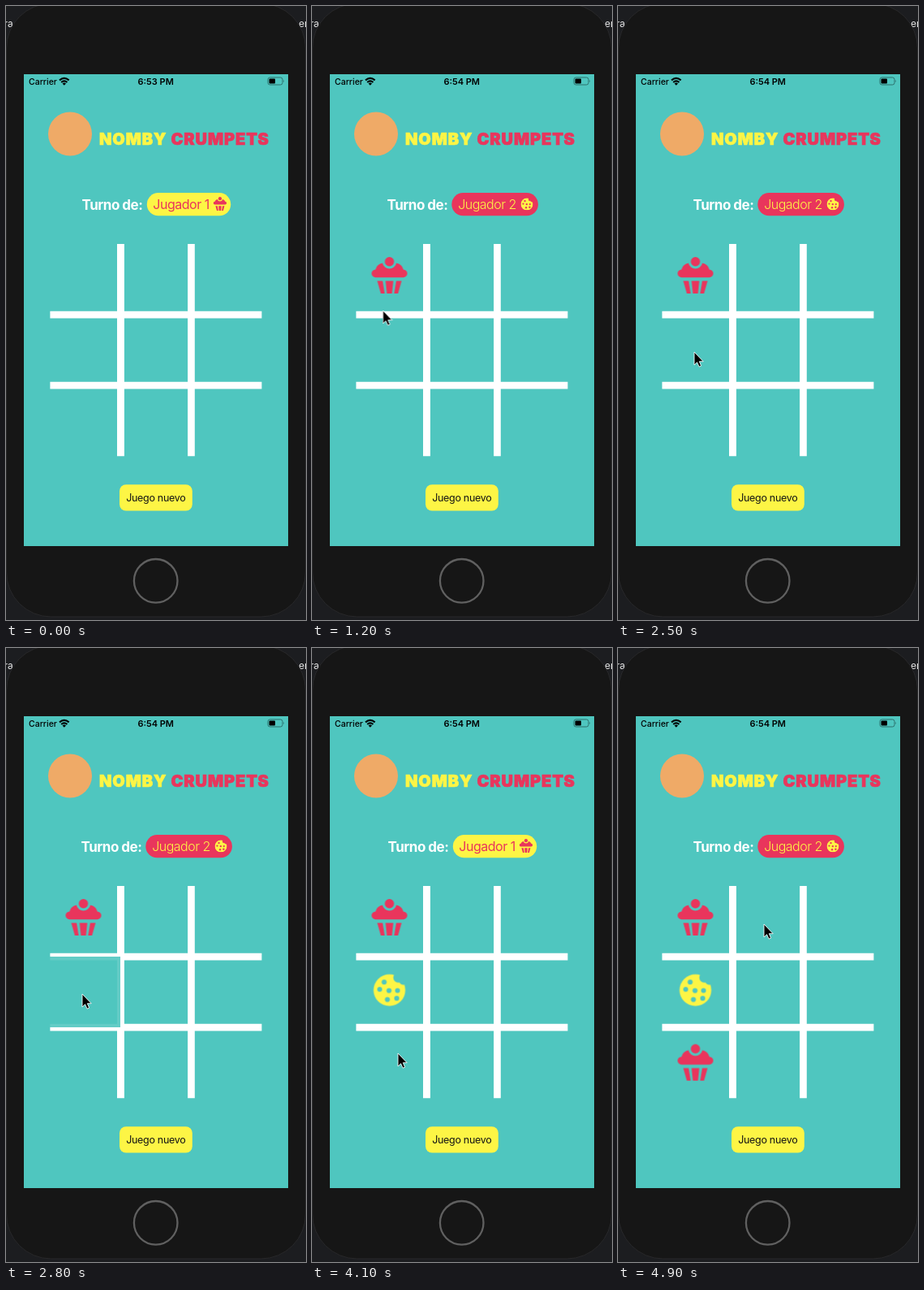
Recreate the animation shown at these times as an HTML page. Size 370x756 px, loop 5 s.

```html
<!DOCTYPE html>
<html lang="es">
<head>
<meta charset="utf-8">
<title>Tres en raya</title>
<style>
html, body { margin: 0; width: 100%; height: 100%; overflow: hidden; background: #1c1d20; }
svg { display: block; width: 370px; height: 756px; font-family: Inter, Roboto, sans-serif; }
:root { --teal: #4fc6bf; --yellow: #fdf545; --pink: #e9355c; }
.teal { fill: var(--teal); }
.yellow { fill: var(--yellow); }
.pink { fill: var(--pink); }
.mid { text-anchor: middle; }
.status { font-size: 10.5px; font-weight: 500; }
.clock { font-size: 11px; font-weight: 600; }
.brand { font-size: 20px; font-weight: 900; letter-spacing: .9px; stroke-width: .7; }
.turn { font-size: 17px; font-weight: 700; letter-spacing: -.5px; fill: #fff; }
.player { font-size: 16px; letter-spacing: -.5px; }
.button { font-size: 12.5px; letter-spacing: -.3px; }

.clock, .one, .two, .piece, .cell { animation: 5s step-end infinite; }
.old { animation-name: old; }
.new { animation-name: new; }
.one { animation-name: one; }
.two { animation-name: two; }
.cell { animation-name: press; }
.c2 { animation-delay: -3.1s; }
.c3 { animation-delay: -1.4s; }
.p1 { animation-name: p1; }
.p2 { animation-name: p2; }
.p3 { animation-name: p3; }
.cursor { animation: move 5s infinite; }

@keyframes old { 0% { opacity: 1 } 6%, 100% { opacity: 0 } }
@keyframes new { 0% { opacity: 0 } 6%, 100% { opacity: 1 } }
@keyframes one { 0%, 58% { opacity: 1 } 20%, 92%, 100% { opacity: 0 } }
@keyframes two { 0%, 58% { opacity: 0 } 20%, 92%, 100% { opacity: 1 } }
@keyframes p1 { 0% { opacity: 0 } 20%, 100% { opacity: 1 } }
@keyframes p2 { 0% { opacity: 0 } 58%, 100% { opacity: 1 } }
@keyframes p3 { 0% { opacity: 0 } 92%, 100% { opacity: 1 } }
@keyframes press {
  0% { opacity: 1 }
  14% { opacity: .5 }
  16% { opacity: .12 }
  20% { opacity: .4 }
  22% { opacity: .8 }
  24%, 100% { opacity: 1 }
}
@keyframes move {
  0% { opacity: 0; transform: translate(108px, 450px); animation-timing-function: step-end }
  6% { opacity: 1; transform: translate(108px, 450px); animation-timing-function: steps(4) }
  14% { transform: translate(84.5px, 349px); animation-timing-function: step-end }
  20% { transform: translate(84.5px, 349px); animation-timing-function: steps(2) }
  24% { transform: translate(87.5px, 375px); animation-timing-function: steps(6) }
  36% { transform: translate(94px, 438px); animation-timing-function: steps(7) }
  50% { transform: translate(94px, 426px); animation-timing-function: step-end }
  58% { transform: translate(94px, 426px); animation-timing-function: steps(3) }
  64% { transform: translate(133px, 443px); animation-timing-function: steps(5) }
  74% { transform: translate(112px, 488px); animation-timing-function: steps(4) }
  82% { transform: translate(106px, 499px); animation-timing-function: step-end }
  92% { transform: translate(106px, 499px); animation-timing-function: steps(3) }
  98%, 100% { opacity: 1; transform: translate(180px, 340px); animation-timing-function: step-end }
}
</style>
</head>
<body>
<svg viewBox="0 0 370 756">
  <defs>
    <g id="cupcake">
      <circle cx="22" cy="5.8" r="5.7"/>
      <path d="M5 25.2A4.9 4.9 0 0 1 4.8 15.4Q6.5 9 13.4 7.6A8.8 8.8 0 0 0 30.6 7.6Q37.5 9 39.2 15.4A4.9 4.9 0 0 1 39 25.2Z"/>
      <path d="M7 29.5H13.6L16.2 45H11.4ZM17.2 29.5H26.8L25.2 45H18.8ZM37 29.5H30.4L27.8 45H32.6Z"/>
    </g>
    <mask id="bites">
      <circle cx="20" cy="20" r="19.6" fill="#fff"/>
      <circle cx="31" cy="4.5" r="6.2"/>
      <circle cx="37" cy="8.5" r="5"/>
      <circle cx="13.5" cy="10" r="3.1"/>
      <circle cx="8" cy="19" r="3"/>
      <circle cx="19.5" cy="20.5" r="3.1"/>
      <circle cx="30" cy="20.5" r="3"/>
      <circle cx="17.5" cy="31.5" r="3.1"/>
      <circle cx="29" cy="30" r="3.1"/>
    </mask>
    <g id="cookie"><rect width="40" height="40" mask="url(#bites)"/></g>
  </defs>

  <!-- phone -->
  <rect width="370" height="756" fill="#1c1d20"/>
  <g font-size="12" fill="#e8e8e8">
    <text x="-2.5" y="26">ra</text>
    <text x="361" y="26">er</text>
  </g>
  <rect x=".5" y="-3" width="369" height="755" rx="55" fill="#161616" stroke="#28282a"/>
  <circle cx="184.7" cy="707.8" r="26.8" fill="none" stroke="#606060" stroke-width="2.3"/>
  <rect class="teal" x="22" y="84" width="326" height="581"/>

  <!-- status bar -->
  <text class="status" x="28" y="97">Carrier</text>
  <path d="M66 91.4Q71.8 86.4 77.6 91.4M68.2 94Q71.8 90.8 75.4 94" fill="none" stroke="#000" stroke-width="2.1"/>
  <path d="M69.6 95.4Q71.8 93.6 74 95.4L71.8 97.8Z"/>
  <text class="clock mid old" x="184.7" y="97">6:53 PM</text>
  <text class="clock mid new" x="184.7" y="97">6:54 PM</text>
  <rect x="323" y="88" width="18" height="9" rx="2.5" fill="none" stroke="#2d706c"/>
  <rect x="324.5" y="89.5" width="7.5" height="6" rx="1"/>
  <path d="M342.3 91Q344 92.5 342.3 94Z" fill="#2d706c"/>

  <!-- header -->
  <circle cx="79" cy="157.5" r="27" fill="#efaa67"/>
  <text class="brand yellow" x="115" y="171.3" stroke="#fdf545">NOMBY</text>
  <text class="brand pink" x="203.5" y="171.3" stroke="#e9355c">CRUMPETS</text>

  <g class="one">
    <text class="turn mid" x="131" y="250.5">Turno de:</text>
    <rect class="yellow" x="173.8" y="230" width="103.4" height="28.3" rx="14.1"/>
    <text class="player mid pink" x="216" y="249.5">Jugador 1</text>
    <use href="#cupcake" class="pink" transform="translate(255.8 235) scale(.37 .38)"/>
  </g>
  <g class="two">
    <text class="turn mid" x="130" y="250.5">Turno de:</text>
    <rect class="pink" x="172.3" y="230" width="106.6" height="28.3" rx="14.1"/>
    <text class="player mid yellow" x="216" y="249.5" font-weight="300">Jugador 2</text>
    <use href="#cookie" class="yellow" transform="translate(257.4 236.3) scale(.38)"/>
  </g>

  <!-- board -->
  <g fill="#fff">
    <path d="M141 293H145.9V554.2H141ZM224.1 293H232.8V554.2H224.1ZM141 375.8H315.4V384.5H141ZM141 462.7H315.4V471.4H141Z"/>
    <g class="cell c1">
      <path d="M137 293H141V380H54.4V375.8H137Z"/>
      <use href="#cupcake" class="piece p1 pink" x="73.5" y="309"/>
    </g>
    <g class="cell c2">
      <path d="M54.4 380H141V467H54.4V462.7H137V384.5H54.4Z"/>
      <use href="#cookie" class="piece p2 yellow" x="75.5" y="401.3"/>
    </g>
    <g class="cell c3">
      <path d="M54.4 467H141V554.2H137V471.4H54.4Z"/>
      <use href="#cupcake" class="piece p3 pink" x="73.5" y="487.7"/>
    </g>
  </g>

  <rect class="yellow" x="140" y="589.2" width="89.8" height="32.3" rx="8"/>
  <text class="button mid" x="184.8" y="610" fill="#151515">Juego nuevo</text>

  <g class="cursor">
    <path d="M0 0V16L3.6 12.7 6 18.2 8.6 17.1 6.3 11.7H11.2Z" stroke="#fff" stroke-opacity=".85" stroke-linejoin="round"/>
  </g>
</svg>
</body>
</html>
```
